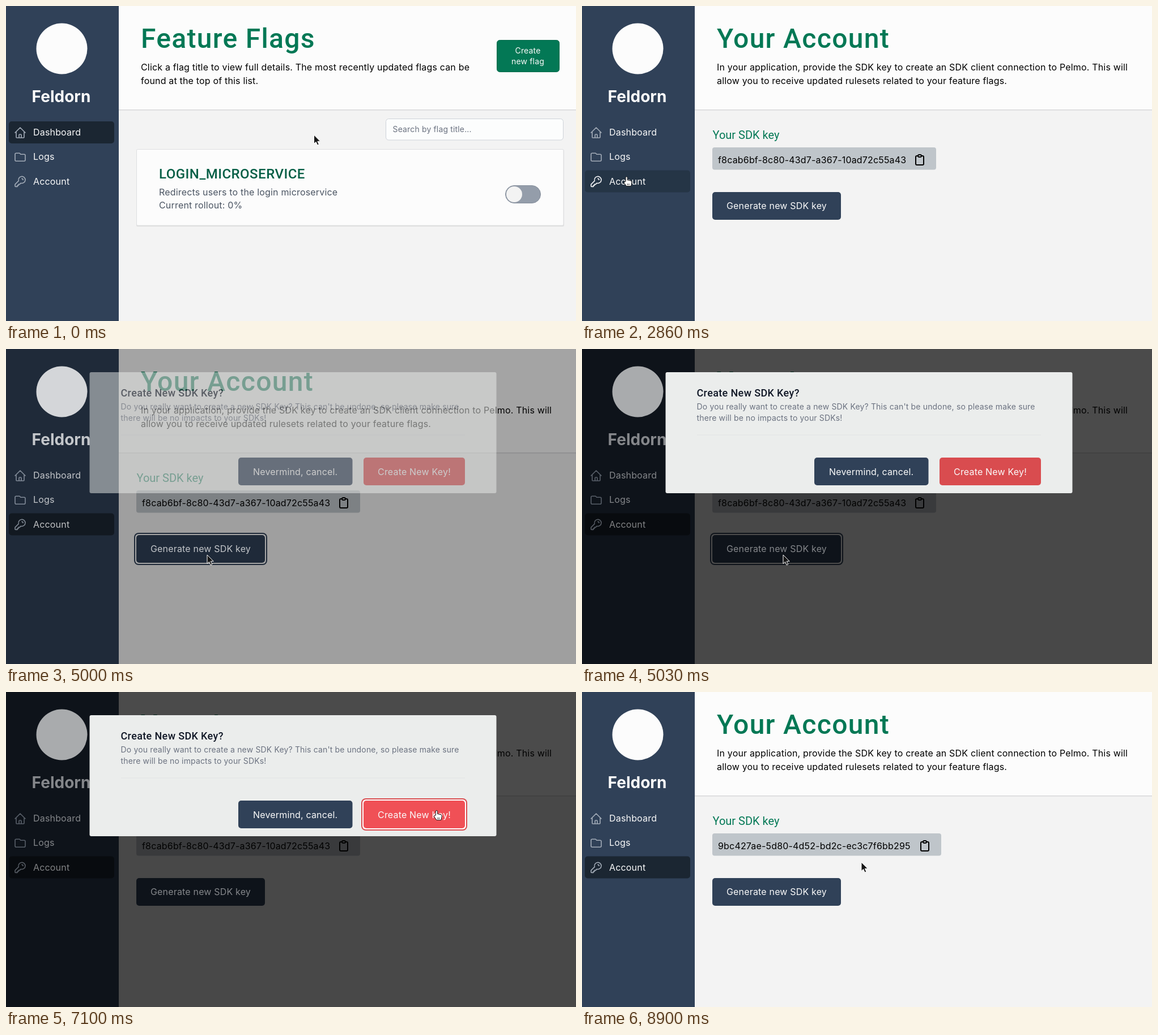
Write an HTML page that moves like this. It is 1006 by 557 pixels and loops after 9860 ms.

```html
<!DOCTYPE html>
<html lang="en">
<head>
<meta charset="utf-8">
<title>Feature flag dashboard</title>
<style>
  html, body { margin: 0; width: 100%; height: 100%; overflow: hidden; background: #f3f3f3; }
  svg { display: block; width: 100%; height: 100%; }
  text { font: 400 16px Inter, "Open Sans", sans-serif; letter-spacing: .011em; }
  .head { font: 500 48px Roboto, Inter, sans-serif; letter-spacing: .027em; fill: #037855; }
  .flag { font: 500 24px Roboto, Inter, sans-serif; letter-spacing: .02em; fill: #065f46; }
  .ask { font: 500 18px Roboto, Inter, sans-serif; letter-spacing: .02em; fill: #111827; }
  .label { font: 400 20px Roboto, Inter, sans-serif; letter-spacing: 0; fill: #037855; }
  .brand { font: 700 28px Inter, Roboto, sans-serif; letter-spacing: 0; fill: #fcfcfc; }
  .small { font-size: 14px; }
  .grey { fill: #4b5563; }
  .soft { fill: #6b7280; }
  .light { fill: #fafafa; }
  .mid { text-anchor: middle; }
  .icon { fill: none; stroke-width: 1.6; stroke-linecap: round; stroke-linejoin: round; }
</style>
</head>
<body>
<svg id="stage" viewBox="0 0 1006 557" preserveAspectRatio="none"></svg>
<script>
const LOOP = 9860;
const NAVY = '#304158', RED = '#d94c4f';

const icons = {
  home: 'M3 12l2-2m0 0l7-7 7 7M5 10v10a1 1 0 001 1h3m10-11l2 2m-2-2v10a1 1 0 01-1 1h-3m-6 0a1 1 0 001-1v-4a1 1 0 011-1h2a1 1 0 011 1v4a1 1 0 001 1m-6 0h6',
  folder: 'M3 7v10a2 2 0 002 2h14a2 2 0 002-2V9a2 2 0 00-2-2h-6l-2-2H5a2 2 0 00-2 2z',
  key: 'M15 7a2 2 0 012 2m4 0a6 6 0 01-7.743 5.743L11 17H9v2H7v2H4a1 1 0 01-1-1v-2.586a1 1 0 01.293-.707l5.964-5.964A6 6 0 1121 9z',
  clip: 'M9 5H7a2 2 0 00-2 2v12a2 2 0 002 2h10a2 2 0 002-2V7a2 2 0 00-2-2h-2M9 5a2 2 0 002 2h2a2 2 0 002-2M9 5a2 2 0 012-2h2a2 2 0 012 2'
};

// Clickable areas: x, y, width, height
const areas = {
  nav0: [5, 204, 186, 39],
  nav1: [5, 247, 186, 39.5],
  nav2: [5, 290.5, 186, 39],
  gen: [230, 329, 227, 49],
  make: [631, 192, 179, 49]
};

const text = (x, y, str, cls = '', id = '') =>
  `<text x="${x}" y="${y}" class="${cls}"${id && ` id="${id}"`}>${str}</text>`;
const rect = ([x, y, w, h], fill, r = 0, more = '') =>
  `<rect x="${x}" y="${y}" width="${w}" height="${h}" rx="${r}" fill="${fill}" ${more}/>`;
const grow = ([x, y, w, h], d) => [x - d, y - d, w + 2 * d, h + 2 * d];
const ring = (id, box, color) =>
  `<g id="${id}">${rect(grow(box, 4), color, 8)}${rect(grow(box, 2), '#fff', 6)}</g>`;
const icon = (name, x, y, more) =>
  `<path class="icon" d="${icons[name]}" transform="translate(${x} ${y})" ${more}/>`;

const navItems = [['Dashboard', 'home'], ['Logs', 'folder'], ['Account', 'key']];
const navLabel = ([name, pic], i) =>
  icon(pic, 13, 212 + i * 43.2, `id="icon${i}"`) + text(48, 229 + i * 43.3, name, 'light');

const dashboard = `<g id="dash">
  ${text(238, 74, 'Feature Flags', 'head')}
  ${text(238, 114, 'Click a flag title to view full details. The most recently updated flags can be')}
  ${text(238, 138, 'found at the top of this list.')}
  ${rect([866.5, 60.5, 110, 56], '#037855', 5, 'stroke="#046a4b"')}
  ${text(921, 83.5, 'Create', 'small light mid')}
  ${text(921, 103, 'new flag', 'small light mid')}
  ${rect([670.5, 199.5, 313, 37.5], '#fcfdfd', 5, 'stroke="#ced3d9"')}
  ${text(682.5, 223, 'Search by flag title...', 'small soft')}
  ${rect([230, 254, 755, 136], '#000', 2, 'opacity=".08"')}
  ${rect([230.5, 253.5, 753.5, 134.5], '#fcfcfc', 2, 'stroke="#dedfe1"')}
  ${text(270, 305, 'LOGIN_MICROSERVICE', 'flag')}
  ${text(270, 334.5, 'Redirects users to the login microservice', 'grey')}
  ${text(270, 358, 'Current rollout: 0%', 'grey')}
  ${rect([881.5, 317.5, 62, 31], '#949daa', 15.5, 'stroke="#858e9b"')}
  <circle cx="897" cy="333" r="14" fill="#f3f3f3"/>
</g>`;

const account = `<g id="acct">
  ${text(238, 74, 'Your Account', 'head')}
  ${text(238, 114, 'In your application, provide the SDK key to create an SDK client connection to Pelmo. This will')}
  ${text(238, 138, 'allow you to receive updated rulesets related to your feature flags.')}
  ${text(230.5, 235, 'Your SDK key', 'label')}
  ${rect([230, 250, 395, 39.5], '#bfc5ca', 4, 'id="keyBox"')}
  ${text(240, 277.5, '', '', 'keyText')}
  <g id="clip">${icon('clip', 584, 260, 'stroke="#000" style="stroke-width:2"')}</g>
  ${ring('genRing', areas.gen, NAVY)}
  ${rect(areas.gen, NAVY, 5, 'id="gen"')}
</g>`;

const modal = `<g id="modal">
  ${rect([147.5, 41, 718, 214], '#ebedec', 3)}
  ${text(202.5, 83.5, 'Create New SDK Key?', 'ask')}
  ${text(202.5, 107, "Do you really want to create a new SDK Key? This can't be undone, so please make sure", 'small soft')}
  ${text(202.5, 127, 'there will be no impacts to your SDKs!', 'small soft')}
  ${rect([203, 151.5, 607, 1], '#e2e4e5')}
  ${rect([410, 192, 201.5, 49], NAVY, 5)}
  ${text(510.7, 222.5, 'Nevermind, cancel.', 'light mid')}
  ${ring('makeRing', areas.make, RED)}
  ${rect(areas.make, RED, 5, 'id="make"')}
  ${text(720.5, 222.5, 'Create New Key!', 'light mid')}
</g>`;

document.getElementById('stage').innerHTML = `
  ${rect([0, 0, 1006, 557], '#f3f3f3')}
  ${rect([199, 0, 807, 185], '#e6e6e6')}
  ${rect([199, 0, 807, 184], '#d6d7d8')}
  ${rect([199, 0, 807, 183], '#fcfcfc')}
  ${rect([0, 0, 199, 557], NAVY)}
  ${navItems.map((_, i) => rect(areas['nav' + i], 'none', 5, `id="nav${i}"`)).join('')}
  ${dashboard}${account}
  ${rect([0, 0, 1006, 557], '#000', 0, 'id="dim"')}
  <circle id="logo" cx="98.5" cy="75.5" r="45" fill="#fcfcfc"/>
  <g id="lights">
    ${text(97.5, 170, 'Feldorn', 'brand mid')}
    ${navItems.map(navLabel).join('')}
    ${text(343.5, 359, 'Generate new SDK key', 'light mid', 'genLabel')}
  </g>
  ${modal}
  <g id="cursor">
    <path id="arrow" d="M0 0V15.6l3.6-3.3 2.5 5.7 2.7-1.2-2.5-5.5h4.9z" fill="#161616" stroke="#fff"/>
    <path id="hand" d="M-1.6 8V1.2a1.6 1.6 0 013.2 0V5.6l5.6 1.1q2 .5 2 2.4l-1.2 7.2H-.2l-4-5.6q-.8-1.6.8-2zM2 12v2.5M4.4 12v2.5" fill="#fff" stroke="#161616"/>
  </g>`;

const ui = {};
document.querySelectorAll('[id]').forEach(el => ui[el.id] = el);
const set = (id, attrs) => { for (const k in attrs) ui[id].setAttribute(k, attrs[k]); };
const show = (id, on) => set(id, { visibility: on ? 'visible' : 'hidden' });

// Cursor moves: start, end, steps, target x, target y
const moves = [
  [730, 1300, 9, 144, 275], [1400, 1530, 2, 77, 303],
  [2860, 3030, 3, 83, 300], [3360, 3730, 7, 235.5, 374.5],
  [3760, 3790, 1, 246, 396], [3900, 4160, 5, 355, 364],
  [5760, 6400, 9, 760, 210], [7930, 8900, 11, 493, 301]
];

function cursorAt(t) {
  let x = 543.5, y = 228;
  for (const [from, to, n, tx, ty] of moves) {
    if (t < from) break;
    const k = Math.min(n, 1 + Math.floor((t - from) * (n - 1) / (to - from))) / n;
    const ease = k * k * (3 - 2 * k);
    x += (tx - x) * ease;
    y += (ty - y) * ease;
  }
  return [x, y];
}

function hoverAt(px, py, names) {
  return names.find(name => {
    const [x, y, w, h] = areas[name];
    const dx = Math.min(px - x, x + w - px), dy = Math.min(py - y, y + h - py);
    return dx > 0 && dy > 0 && dx + dy > 10;
  });
}

function draw(t) {
  const onAccount = t >= 2170;
  const open = t >= 5000 && t < 7300;
  const fade = !open ? 0 : t < 5030 ? .5 : 1;
  const fresh = t >= 7460;
  const [x, y] = cursorAt(t);
  const targets = open ? ['make'] : ['nav0', 'nav1', 'nav2'].concat(onAccount ? 'gen' : []);
  const hover = hoverAt(x, y, targets);

  show('dash', !onAccount);
  set('acct', { display: onAccount ? 'inline' : 'none' });
  show('genLabel', onAccount);
  navItems.forEach((_, i) => {
    const hot = hover === 'nav' + i, active = i === (onAccount ? 2 : 0);
    set('nav' + i, { fill: hot ? '#253546' : active ? '#1b2632' : 'none' });
    set('icon' + i, { stroke: hot ? '#f3f4f6' : '#a3acb8' });
  });

  ui.keyText.textContent = fresh
    ? '9bc427ae-5d80-4d52-bd2c-ec3c7f6bb295'
    : 'f8cab6bf-8c80-43d7-a367-10ad72c55a43';
  set('keyBox', { width: fresh ? 404 : 395 });
  set('clip', { transform: `translate(${fresh ? 9 : 0} 0)` });
  set('gen', { fill: hover === 'gen' ? '#3b4f6a' : NAVY });
  set('genRing', { display: t >= 4830 && t < 7100 ? 'inline' : 'none' });

  set('dim', { opacity: .7 * fade });
  set('lights', { opacity: 1 - .5 * fade });
  set('logo', { opacity: 1 - .35 * fade });
  set('modal', { opacity: fade });
  set('make', { fill: hover === 'make' ? '#f05056' : RED });
  set('makeRing', { display: t >= 7100 ? 'inline' : 'none' });

  set('cursor', { transform: `translate(${x.toFixed(1)} ${y.toFixed(1)})` });
  show('arrow', !hover);
  show('hand', hover);
}

const start = performance.now();
function tick() {
  draw((performance.now() - start) % LOOP);
  requestAnimationFrame(tick);
}
tick();
</script>
</body>
</html>
```
